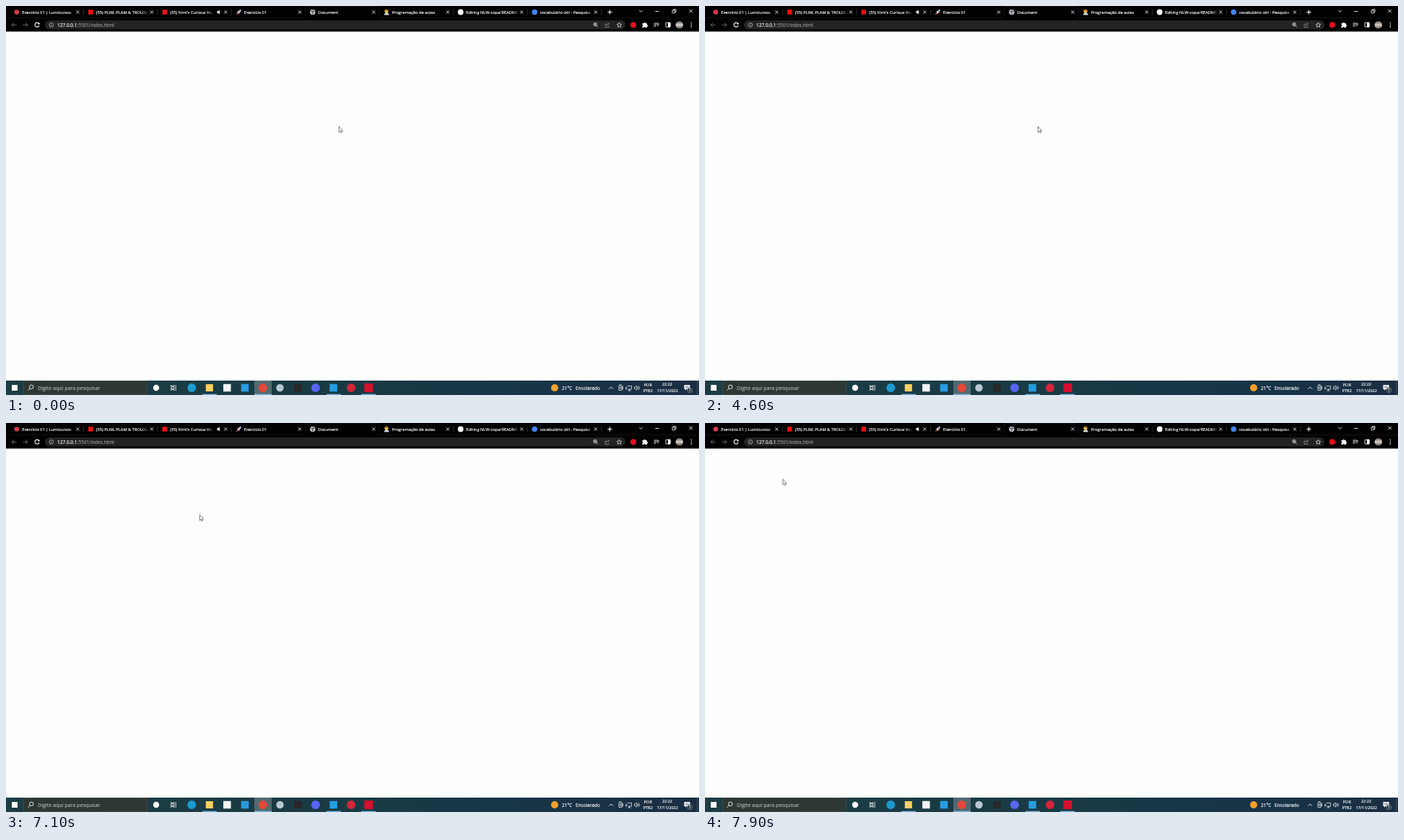
An HTML page for the animation above (8 s loop, 960 by 540 pixels).

```html
<!DOCTYPE html>
<html lang="pt">
<head>
<meta charset="utf-8">
<title>Document</title>
<style>
html, body { margin: 0; width: 100%; height: 100%; overflow: hidden; background: #fdfffd; }
svg { display: block; width: 960px; height: 540px; }
text { font-family: "Open Sans", "Noto Sans", sans-serif; fill: #fff; stroke: #fff; stroke-width: .16; white-space: pre; }
.tab { font-size: 5.75px; }
.url { font-size: 6.5px; }
.soft { fill: #999; stroke: #999; }
.search { font-size: 7.1px; fill: #d3d8d6; stroke: none; }
.weather { font-size: 6.5px; }
.line { fill: none; stroke: #fff; stroke-width: .9; }
.dim { stroke: #777; }
.small { font-size: 5.5px; text-anchor: middle; }
#cursor { animation: move 8s step-end infinite; }
@keyframes move {
  0% { transform: translate(461px, 167px); }
  86.25% { transform: translate(415.5px, 160px); }
  87.5% { transform: translate(343px, 145px); }
  88.75% { transform: translate(268px, 127px); }
  90% { transform: translate(208px, 112px); }
  91.25% { transform: translate(177px, 104px); }
  93.75% { transform: translate(168px, 101px); }
  95% { transform: translate(150px, 95px); }
  96.25% { transform: translate(130px, 87px); }
  97.5% { transform: translate(114px, 80px); }
  98.75%, 100% { transform: translate(107.5px, 77.5px); }
}
</style>
</head>
<body>
<svg viewBox="0 0 960 540">
  <defs>
    <linearGradient id="bar">
      <stop stop-color="#1d3d43"/><stop offset=".5" stop-color="#193a44"/>
      <stop offset=".72" stop-color="#173648"/><stop offset="1" stop-color="#1b2e43"/>
    </linearGradient>
    <linearGradient id="fade">
      <stop stop-color="#000" stop-opacity="0"/><stop offset="1" stop-color="#000"/>
    </linearGradient>
    <linearGradient id="photo" x2="0" y2="1">
      <stop stop-color="#6b5f5b"/><stop offset=".5" stop-color="#d8cfc9"/><stop offset="1" stop-color="#5a5350"/>
    </linearGradient>
  </defs>

  <rect width="960" height="540" fill="#fdfffd"/>
  <rect width="960" height="35.5" fill="#000"/>
  <path d="M0 16.5H412Q414.500 16.500 414.500 14V3Q414.500 .5 417 .5H514.500Q517 .5 517 3V14Q517 16.500 519.500 16.500H960" fill="none" stroke="#242424" stroke-width=".5"/>
  <g id="tabs"></g>

  <!-- window controls -->
  <g class="line">
    <path d="M833.5 8.5h6M836.5 5.5v6" stroke-width="1.1"/>
    <path d="M877.3 6l2.2 2.2L881.7 6M899.5 7.5h5M946.3 4.7l4.6 4.6M950.9 4.7l-4.6 4.6"/>
    <path d="M923 6h3.7v3.7H923ZM924.3 6V4.7H928v3.7h-1.3" stroke-width=".8"/>
  </g>

  <!-- address bar -->
  <rect x="54" y="20" width="804" height="12.5" rx="6.2" fill="#232323"/>
  <g class="line">
    <path class="dim" d="M14.5 26.2h-6.5M11 23.2l-3 3 3 3M23.5 26.2h6.5M27 23.2l3 3-3 3"/>
    <path d="M45.5 24.4a3 3 0 1 0 .4 2.6" stroke-width="1.1"/>
    <path d="M46.5 22.7v2.8h-2.8Z" fill="#fff" stroke="none"/>
    <circle cx="62.8" cy="26.3" r="2.9" stroke="#ccc" stroke-width=".7"/>
    <path d="M62.8 25.9v2M62.8 24.5v.7" stroke="#ccc" stroke-width=".8"/>
    <circle cx="816.2" cy="25.5" r="2.2" stroke-width=".8"/>
    <path d="M817.8 27.2l2 2M815.2 25.5h2M816.2 24.5v2" stroke-width=".8"/>
    <path d="M832 25h-2v4.5h5V27.5M831.5 27.7q.3-3 3.5-3M833.5 22.9l2.2 1.800-2.200 1.800" stroke="#999" stroke-width=".7"/>
    <path d="M849.5 23l1 2.2 2.3.2-1.7 1.6.5 2.4-2.1-1.3-2.1 1.3.5-2.4-1.7-1.6 2.3-.2Z" stroke-width=".7"/>
    <path d="M897.5 24h6M897.5 26h4M897.5 28h3M903 28.3V25h2"/>
    <rect x="914" y="23.2" width="6" height="5.8" rx=".5"/>
    <path d="M917.5 23.2h2.5v5.8h-2.5Z" fill="#fff"/>
  </g>
  <text class="url" x="71" y="28.5">127.0.0.1<tspan class="soft">:5501/index.html</tspan></text>
  <circle cx="869" cy="26.3" r="4" fill="#e4101b"/>
  <path d="M881.5 24h2a1.200 1.200 0 0 1 2.400 0h2v2a1.200 1.200 0 0 1 0 2.400v1.600h-2.200a1 1 0 0 0-2 0h-2.200v-2.200a1 1 0 0 0 0-2Z" fill="#fff"/>
  <circle cx="932.8" cy="26.3" r="5.2" fill="url(#photo)"/>
  <g fill="#fff"><circle cx="949.3" cy="23.5" r=".8"/><circle cx="949.3" cy="26.2" r=".8"/><circle cx="949.3" cy="28.9" r=".8"/></g>

  <!-- taskbar -->
  <rect y="520" width="960" height="20" fill="url(#bar)"/>
  <rect x="24.3" y="520.3" width="171.5" height="19.4" fill="#2d3734" stroke="#4b5957" stroke-width=".6"/>
  <rect x="8" y="526" width="8" height="8" fill="#fff"/>
  <g class="line">
    <circle cx="35.2" cy="528.8" r="2.7"/><path d="M33.3 530.8l-2.8 2.9"/>
    <path d="M228.5 526v1.5h4.5V526M228.5 534v-1.5h4.5V534M228.5 528.8h4.5v2.4h-4.5ZM235.2 526v8" stroke-width=".8"/>
  </g>
  <text class="search" x="44" y="532.8">Digite aqui para pesquisar</text>
  <rect x="344" y="520" width="24" height="20" fill="#536a70"/>
  <g fill="#78b9e6">
    <rect x="272" y="538.7" width="20" height="1.3"/><rect x="344" y="538.7" width="24" height="1.3"/>
    <rect x="444" y="538.7" width="20" height="1.3"/><rect x="492" y="538.7" width="20" height="1.3"/>
  </g>
  <g id="apps"></g>

  <!-- tray -->
  <circle cx="760" cy="530" r="5" fill="#f5a02c"/>
  <text class="weather" x="770" y="532.5">21°C</text>
  <text class="weather" x="789" y="532.5">Ensolarado</text>
  <g class="line" stroke-width=".8">
    <path d="M835.5 531.7l2.800-2.800 2.800 2.800"/>
    <path d="M849 527h4v6.5h-4ZM849.5 525.8h3M853 529l1.500-1v4l-1.500-1" stroke-width=".7"/>
    <circle cx="851" cy="530.3" r="1" stroke-width=".7"/>
    <path d="M860.5 527.5h6v4.5h-5M863.5 532v2M861.5 534h4M859 528.5v4.5M858.2 530.5h2.5" stroke-width=".7"/>
    <path d="M870.5 528.8h1.4l2-1.800v6.200l-2-1.800h-1.400ZM875.200 528.500q1.200 1.600 0 3.200M876.600 527.500q2 2.600 0 5.200" stroke-width=".7"/>
  </g>
  <text class="small" x="889.3" y="528">POR</text>
  <text class="small" x="889.3" y="536.3">PTB2</text>
  <text class="small" x="916" y="527.4">22:22</text>
  <text class="small" x="916.3" y="536.3">17/11/2022</text>
  <path d="M939.5 526h8v6h-5l-1.500 1.700V532h-1.500Z" fill="#fff"/>
  <path d="M941 528h5M941 529.8h5" stroke="#1b2d3e" stroke-width=".6"/>
  <circle cx="947.3" cy="533.3" r="3.4" fill="#263b43" stroke="#bbb" stroke-width=".5"/>
  <text class="small" x="947.3" y="535.2">1</text>
  <path d="M957.7 520v20" stroke="#5c6b76" stroke-width=".6"/>

  <path id="cursor" d="M.3.3V8.3L2 6.700 3.300 9.200 4.500 8.600 3.300 6.200H5.600Z" fill="#fff" stroke="#222" stroke-width=".6"/>
</svg>
<script>
const circle = (x, y, r, fill) => `<circle cx="${x}" cy="${y}" r="${r}" fill="${fill}"/>`;
const square = (x, y, s, fill) => `<rect x="${x - s / 2}" y="${y - s / 2}" width="${s}" height="${s}" fill="${fill}"/>`;

const rocket = `<path d="M3.5-3.8Q0-3.5-2 .5L0 2.2Q3.5 0 3.5-3.8Z" fill="#c9d6df"/>
  <path d="M-.8-1.5L-3.2 0-2 .8ZM1.8.8L.3 3.3-.3 2Z" fill="#d5304f"/>
  <path d="M-2 1.2L-3.6 3.8-.8 2.3Z" fill="#f5a623"/><circle cx="1.3" cy="-1.3" r=".9" fill="#3b88c3"/>`;
const globe = `<circle r="3.7" fill="#c9cdd1"/>
  <path d="M-2.8-1.4L-.5-.5.5 1-1 2.8M0-3.3L.6-1.5 3-.8" fill="none" stroke="#3c4043" stroke-width="1.1"/>`;
const student = `<path d="M-3.5 4Q-3 .8 0 .8T3.5 4Z" fill="#cfd8dc"/>
  <circle cx="-.3" cy="-1.3" r="2.5" fill="#f6c744"/><path d="M-3-1.5Q-2.5-4.5 0-4T2.5-1.5Z" fill="#b5762c"/>`;
const speaker = `<path d="M82.5 7.3h1.4L86 5.500v6l-2.100-1.800h-1.400ZM87 7q1 1.500 0 3" fill="#fff"/>`;

const tabs = [
  ["Exercício 01 | Lumicursos", circle(0, 0, 3.3, "#d63a4a")],
  ["(55) PLIM, PLAM & TROLOLÓ", square(0, 0, 6.5, "#f00f14")],
  ["(55) Kimi's Curious Voyage", square(0, 0, 6.5, "#f00f14"), speaker],
  ["Exercício 01", rocket],
  ["Document", globe],
  ["Programação de aulas", student],
  ["Editing NLW-copa/README.md", circle(0, 0, 3.9, "#fff")],
  ["vocabulário útil - Pesquisa", circle(0, 0, 3.8, "#4285f4")]
];
const active = 4;

document.getElementById("tabs").innerHTML = tabs.map(([title, icon, sound = ""], i) => {
  const end = sound ? 69 : 82;
  const label = title.replace("&", "&amp;");
  const nearActive = i === active || i === active - 1;
  const edge = nearActive ? "" : `<path d="M102.5 4.5v8" stroke="#555" stroke-width=".6"/>`;
  return `<g transform="translate(${4.9 + 102.5 * i} 0)">
    <g transform="translate(9.9 8.5)">${icon}</g>
    <text class="tab" x="17.3" y="10.6">${label}</text>
    <rect x="${end}" y="1" width="8" height="15" fill="url(#fade)"/>
    <rect x="${end + 8}" y="1" width="${93.5 - end}" height="15" fill="#000"/>
    ${sound}
    <path class="line" d="M92.5 6.5l4 4M96.5 6.5l-4 4"/>${edge}</g>`;
}).join("");

const apps = [
  [circle, 208, 4.2, "#fff"], [circle, 257.3, 6, "#1b9bd0"], [square, 281.8, 10, "#f8cf62"],
  [square, 306.3, 10.5, "#f2f4f5"], [square, 331, 10.5, "#2a9be0"], [circle, 355.8, 6, "#e6483a"],
  [circle, 379.5, 5.2, "#b9c7d1"], [square, 404.3, 10.5, "#282828"], [circle, 428.8, 6, "#5865f2"],
  [square, 453.6, 10.5, "#249de0"], [circle, 478, 6, "#d32638"], [square, 502.4, 12, "#d3102d"]
];
document.getElementById("apps").innerHTML =
  apps.map(([shape, x, size, fill]) => shape(x, 530, size, fill)).join("");
</script>
</body>
</html>
```
